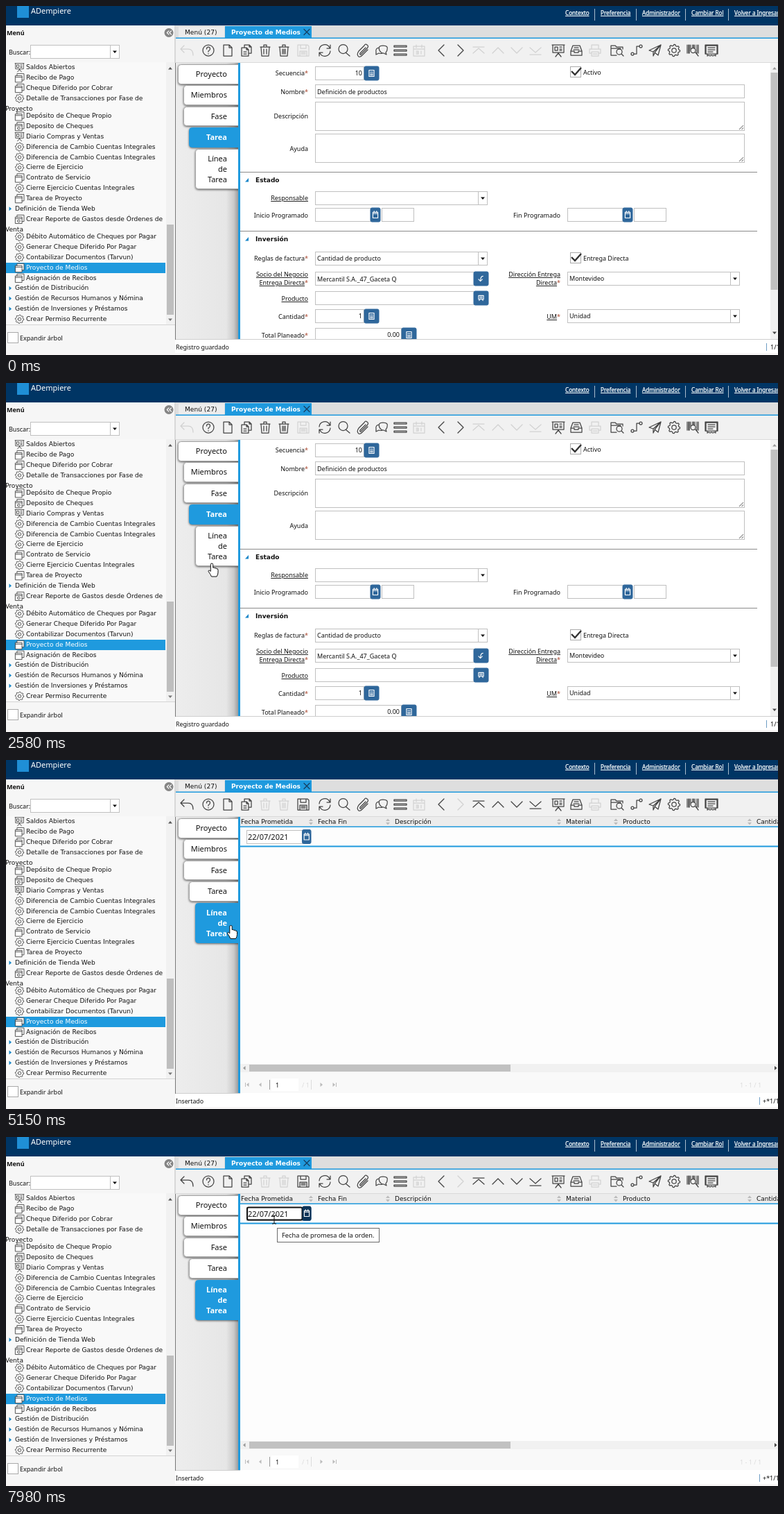
An HTML page for the animation above (8000 ms loop, 1114 by 503 pixels).

```html
<!DOCTYPE html>
<html lang="es">
<head>
<meta charset="utf-8">
<title>Proyecto de Medios</title>
<style>
html, body { margin: 0; width: 100%; height: 100%; overflow: hidden; background: #fff; }
svg { display: block; width: 1114px; height: 503px; }
text { font-family: "Noto Sans", "Open Sans", sans-serif; font-size: 9px; fill: #111; white-space: pre; }
.v { font-family: "DejaVu Sans", sans-serif; }
.b { font-weight: bold; }
.u { text-decoration: underline; }
.e { text-anchor: end; }
.w { fill: #fff; }
.u.w { stroke: #fff; stroke-width: .25; }
.i { stroke-width: 1.25; stroke-linecap: round; stroke-linejoin: round; }
.tab { filter: drop-shadow(0 1px 1.5px rgba(0, 0, 0, .6)); }
</style>
</head>
<body>
<svg id="stage" viewBox="0 0 1114 503" xmlns="http://www.w3.org/2000/svg"></svg>
<script>
const BLUE = '#1f9ade', BTN = '#2f679b', INK = '#444', PALE = '#d2d2d2', EDGE = '#c0c0c0';

// Drawing helpers; boxes are given by their corners
const box = (x, y, x2, y2, fill, more = '') =>
  `<rect x="${x}" y="${y}" width="${x2 - x}" height="${y2 - y}" fill="${fill}" ${more}/>`;
const frame = (x, y, x2, y2, fill = '#fff', line = EDGE, more = '') =>
  box(x + .5, y + .5, x2 - .5, y2 - .5, fill, `stroke="${line}" ${more}`);
const text = (x, y, s, cls = '', size = 9) =>
  `<text x="${x}" y="${y}" class="${cls}" style="font-size:${size}px">${s}</text>`;
const path = (x, y, d, fill, more = '') =>
  `<path transform="translate(${x} ${y})" d="${d}" fill="${fill}" ${more}/>`;
const icon = (x, y, d, color = INK, scale = 1, fill = 'none') =>
  `<path class="i" transform="translate(${x} ${y}) scale(${scale})" d="${d}" stroke="${color}" fill="${fill}"/>`;
const tri = { down: 'M-3-1.5H3L0 2Z', up: 'M-3 1.5H3L0-2Z', left: 'M1.5-3V3L-2 0Z', right: 'M-1.5-3V3L2 0Z' };

const circle = r => `M${-r} 0a${r} ${r} 0 1 0 ${2 * r} 0a${r} ${r} 0 1 0 ${-2 * r} 0`;
const gear = (() => {
  let d = '';
  for (let k = 0; k < 32; k++) {
    const a = k * Math.PI / 16, r = k % 4 < 2 ? 8.6 : 6.8;
    d += `${k ? 'L' : 'M'}${(r * Math.cos(a)).toFixed(1)} ${(r * Math.sin(a)).toFixed(1)}`;
  }
  return d + 'Z' + circle(3.2);
})();
const board = 'M-9-8H9M-8-8V3H8V-8M0 3V5M0 4L-4 9M0 4L4 9M-5-5H-1V0H-5ZM2-5H5M2-2H5M2 0H5';
const windows = 'M-5-4V-8H9V5H5M-8-4H5V9H-8ZM-8-1H5';
const trash = 'M-6-5L-5 8H5L6-5M-7-5H7M-2-5V-8H2V-5M-2-2V5M2-2V5';
const page = 'M-6-8H2L6-4V8H-6ZM2-8V-4H6';
const calendar = 'M-8-6H8V8H-8ZM-8-2H8M-4-8V-4M4-8V-4';

const toolbar = [
  [261, 'undo', 'M-4-7L-9-2L-4 3M-9-2H2Q9-2 9 7'],
  [292, '', circle(8) + 'M-2.5-2Q-2.5-5 0-5T2.5-2Q2.5-.5 0 1V2M0 4.5V5'],
  [320, '', page],
  [347, '', 'M-7-4H0L3-1V8H-7ZM0-4V-1H3M-3-4V-8H4L7-5V4H3M4-8V-5H7M-4 2H0M-4 5H0'],
  [374, 'trash', trash],
  [401, 'trash', trash + 'M0-2V5'],
  [429, 'save', 'M-8-8H6L8-6V8H-8ZM-4-8V-3H4V-8M-5 8V1H5V8M-3 3H3M-3 5H3'],
  [460, '', 'M-8-1A8 8 0 0 1 7-4M8 1A8 8 0 0 1-7 4M8-8V-3H3M-8 8V3H-3'],
  [488, '', 'M-8-2a6.5 6.5 0 1 0 13 0a6.5 6.5 0 1 0-13 0M2 3L8 8'],
  [515, '', 'M4-4L-4 4Q-5 6-3 6L6-3Q9-6 6-8T2-7L-6 1Q-9 5-7 8T-1 7L7-1'],
  [542, '', 'M-3 0Q-6-7 2-7T8-1Q8 1 6 3L7 6L3 4Q-1 4-3 0M-4-4Q-9-3-8 2L-8 6L-4 4Q0 5 1 4'],
  [569, '', 'M-9-7H9V-5H-9ZM-9-1H9V1H-9ZM-9 5H9V7H-9Z'],
  [596, 'cal', calendar + 'M-4 1H-1V5H-4M-4 3H-1M3 1V5'],
  [628, '', 'M4-8L-4 0L4 8'],
  [656, 'next', 'M-4-8L4 0L-4 8'],
  [682, 'nav', 'M-8-5H8M-8 4L0-3L8 4'],
  [710, 'nav', 'M-8 4L0-4L8 4'],
  [737, 'nav', 'M-8-4L0 4L8-4'],
  [764, 'nav', 'M-8 6H8M-8-4L0 3L8-4'],
  [797, '', board],
  [823, '', 'M-8 1L-5-7H5L8 1V7H-8ZM-8 1H-3V3H3V1H8M-3-4H3M-4-1H4'],
  [850, 'print', 'M-5-2V-8H5V-2M-5 4H-8V-2H8V4H5M-5 2H5V8H-5ZM-3 5H3'],
  [882, '', 'M-1 7H-9V-7H-3L-1-5H8V-2M-9-3H5M-1 2a4 4 0 1 0 8 0a4 4 0 1 0-8 0M6 5L9 8'],
  [910, '', 'M-8 5a2 2 0 1 0 4 0a2 2 0 1 0-4 0M4-6a2 2 0 1 0 4 0a2 2 0 1 0-4 0M-4 5H0V-6H4'],
  [937, '', 'M-9 0L8-8L4 7L-1 3L8-8L-3 2ZM-3 2V8L-1 4'],
  [964, '', gear],
  [991, '', 'M-8-8V4M-6-8V4M-5-8V4M-3-8V1M0-8V-4M1-8V-4M3-8V-3M6-8V4M8-8V4M-3 0a3.5 3.5 0 1 0 7 0a3.5 3.5 0 1 0-7 0M4 3L8 8'],
  [1018, '', 'M-9-8H9V5H-9ZM-9-7H9M-8-8V5M8-8V5M-5-4H5M-5-1H5M-5 2H2M-6 5V8L-4 7L-2 8L0 7L2 8L4 7L6 8V5']
];
const drawBar = off => toolbar.map(([x, name, d]) => icon(x, 64, d, off.includes(name) ? PALE : INK)).join('');

const tabs = [
  [248, 84, 113, 'Proyecto'], [256, 114, 143, 'Miembros'], [256, 145, 173, 'Fase'],
  [264, 175, 204, 'Tarea'], [273, 206, 264, 'Línea', 'de', 'Tarea']
];
const drawTabs = active => tabs.map(([x, y, y2, ...lines], n) => {
  const on = n === active;
  return frame(x, y, 340, y2, on ? BLUE : '#fff', on ? BLUE : '#a6a6a6', 'rx="4" class="tab"') +
    lines.map((s, k) => text(319, y + 18 + k * 15, s, on ? 'e b w' : 'e', 11)).join('');
}).join('') + box(335, 82, 338, 480, BLUE);

function drawMenu() {
  const kinds = {
    r: board, w: windows, g: gear,
    f: windows + 'M-4 4a2.5 2.5 0 1 0 5 0a2.5 2.5 0 1 0-5 0'
  };
  const groups = [
    [88, 'r|Saldos Abiertos', 'w|Recibo de Pago', 'w|Cheque Diferido por Cobrar', 'g|Detalle de Transacciones por Fase de'],
    [158, 'w|Depósito de Cheque Propio', 'f|Deposito de Cheques', 'r|Diario Compras y Ventas',
      'g|Diferencia de Cambio Cuentas Integrales', 'g|Diferencia de Cambio Cuentas Integrales',
      'g|Cierre de Ejercicio', 'w|Contrato de Servicio', 'g|Cierre Ejercicio Cuentas Integrales',
      'w|Tarea de Proyecto', 'p|Definición de Tienda Web', 'f|Crear Reporte de Gastos desde Órdenes de'],
    [332, 'g|Débito Automático de Cheques por Pagar', 'g|Generar Cheque Diferido Por Pagar',
      'g|Contabilizar Documentos (Tarvun)', 'w|Proyecto de Medios', 'w|Asignación de Recibos',
      'p|Gestión de Distribución', 'p|Gestión de Recursos Humanos y Nómina',
      'p|Gestión de Inversiones y Préstamos', 'g|Crear Permiso Recurrente']
  ];
  let s = box(0, 28, 244, 503, '#f6f6f6') + text(1, 42, 'Menú', 'b') +
    path(235, 38.5, circle(6.5), '#858585') + icon(235, 38.5, 'M0-3L-3 0L0 3M4-3L1 0L4 3', '#fff', .9) +
    text(4, 70, 'Buscar:') + frame(35, 56, 151, 76) + frame(150, 56, 164, 76) + path(157, 66, tri.down, '#111') +
    box(0, 81, 231, 459, '#f9f9f9') + box(0, 370, 230, 385, BLUE) +
    text(-1, 150.5, 'Proyecto', 'v', 9.08) + text(-1, 324.5, 'Venta', 'v', 9.08);
  for (const [top, ...rows] of groups) rows.forEach((row, n) => {
    const y = top + n * 14.85, [kind, label] = row.split('|'), parent = kind === 'p';
    s += parent ? path(6, y + .5, tri.right, '#1787c9') : icon(19.5, y + .5, kinds[kind], INK, .72, '#fff');
    s += text(parent ? 13 : 29, y + 3.2, label, label === 'Proyecto de Medios' ? 'v w' : 'v', 9.08);
  });
  return s + box(231, 81, 243, 459, '#f1f1f1') + box(232, 315, 242, 445, '#bebebe') +
    path(237, 90, tri.up, '#555') + path(237, 452, tri.down, '#777') +
    box(0, 459, 244, 460, '#d5d5d5') + frame(2, 470, 18, 486, '#fff', '#aaa') + text(20, 482, 'Expandir árbol') +
    box(243, 28, 245, 82, '#d8d8d8') + box(244, 82, 245, 481, '#777');
}

function drawChrome() {
  let s = box(0, 0, 1114, 28, '#003564') + box(16, 0, 33, 17, '#1f8fd6') + text(36, 11, 'ADempiere', 'w', 11);
  [[807, 'Contexto'], [858, 'Preferencia'], [918, 'Administrador'], [989, 'Cambiar Rol'], [1051, 'Volver a Ingresar']]
    .forEach(([x, label], n) => s += text(x, 13, label, 'u w', 8.15) + (n ? box(x - 9, 4, x - 8, 21, '#a9bccd') : ''));
  return s + drawMenu() +
    box(245, 28, 1114, 47, '#dedede') + box(249, 30, 315, 46, '#ececec') + text(258, 41, 'Menú (27)', 'v', 9.1) +
    box(316, 29, 441, 47, BLUE) + text(325, 41, 'Proyecto de Medios', 'v b w', 9) +
    icon(434, 37.5, 'M-4-4L4 4M4-4L-4 4', '#173f61') + box(245, 45.5, 1114, 47, BLUE) +
    box(245, 47, 1114, 82, '#f1f1f1') + box(245, 81, 1114, 82, '#dadada') +
    box(245, 82, 336, 480, 'url(#side)') +
    box(0, 500, 1114, 503, '#f7f5f5') + box(245, 480, 1114, 500, '#fff') + box(245, 480, 1114, 481, '#cfcfcf');
}

const label = (x, y, s, cls = '') => {
  const req = s.endsWith('*');
  return `<text x="${x}" y="${y}" class="e"><tspan class="${cls}">${s.replace('*', '')}</tspan>` +
    (req ? '<tspan fill="#a8452c">*</tspan>' : '') + '</text>';
};
const combo = (x, y, s) => frame(x, y, x + 249, y + 20) + frame(x + 235, y, x + 249, y + 20) +
  path(x + 242, y + 10, tri.down, '#111') + text(x + 3, y + 13, s);
const calc = 'M-4-5H4V5H-4ZM-2-2H2M-2 1H2M-2 3H2';
const day = 'M-4-4H4V5H-4ZM-4-2H4M-2-6V-4M2-6V-4';
const button = (x, y, d, w = 21, color = BTN) =>
  box(x, y, x + w, y + 20, color, `rx="2" stroke="${color}"`) + icon(x + w / 2, y + 10, d, '#fff', .9);
const amount = (y, x2, s) => frame(446, y, x2, y + 20) + text(x2 - 3, y + 13, s, 'e') + button(x2, y, calc);
const check = (y, s) => frame(814, y, 830, y + 16, '#fff', '#aaa') +
  `<path d="M816 ${y + 7}L821 ${y + 12}L830 ${y + 2}" fill="none" stroke="#333" stroke-width="2.4"/>` + text(833, y + 11.5, s);
const dates = x => frame(x, 291, x + 81, 311) + button(x + 80, 291, day, 14) + frame(x + 96, 291, x + 143, 311);
const area = y => frame(446, y, 1066, y + 42) + icon(1061, y + 37, 'M-3 3L3-3M1 3L3 1', '#888', .9);
const section = (y, s) => box(338, y, 1084, y + 1, '#8a8a8a') + path(348, y + 12, 'M2-3V2.5H-3Z', '#1787c9') + text(360, y + 14.5, s, 'v b');

function drawForm() {
  return drawBar(['undo', 'save', 'cal', 'nav', 'print']) + drawTabs(3) + box(338, 82, 1103, 480, '#fff') +
    label(436, 100, 'Secuencia*') + amount(87, 517, '10') + check(87, 'Activo') +
    label(436, 127, 'Nombre*') + frame(446, 113, 1066, 133) + text(449, 126.5, 'Definición de productos') +
    label(436, 162, 'Descripción') + area(138) + label(436, 209, 'Ayuda') + area(184) +
    section(239, 'Estado') + label(436, 280, 'Responsable', 'u') + combo(446, 267, '') +
    label(436, 305, 'Inicio Programado') + dates(446) + label(800, 305, 'Fin Programado') + dates(810) +
    section(324, 'Inversión') + label(436, 367, 'Reglas de factura*') + combo(446, 354, 'Cantidad de producto') +
    check(355, 'Entrega Directa') +
    label(436, 390, 'Socio del Negocio', 'u') + label(436, 402, 'Entrega Directa*', 'u') +
    frame(446, 383, 676, 403) + text(449, 396.5, 'Mercantil S.A._47_Gaceta Q') +
    button(675, 383, 'M3-4Q-1-4-1 4M-4 1L-1 4L2 1') +
    label(800, 390, 'Dirección Entrega', 'u') + label(800, 402, 'Directa*', 'u') + combo(810, 383, 'Montevideo') +
    label(436, 425, 'Producto', 'u') + frame(446, 411, 676, 431) + button(675, 411, 'M-4-4H4V2H-4ZM-2-2H2M-2 0H2M-3 4L-2 2M3 4L2 2') +
    label(436, 451, 'Cantidad*') + amount(437, 517, '1') + label(800, 451, 'UM*', 'u') + combo(810, 437, 'Unidad') +
    label(436, 477.5, 'Total Planeado*') + amount(464, 571, '0.00') +
    box(446, 480, 600, 500, '#fff') + box(338, 480, 1114, 481, '#cfcfcf') +
    box(1103, 82, 1114, 480, '#f1f1f1') + box(1103.5, 96, 1113.5, 409, '#c1c1c1') +
    path(1109, 90, tri.up, '#999') + path(1109, 471, tri.down, '#444') +
    text(245, 495, 'Registro guardado', '', 8.8) + box(1097, 486, 1098, 497, '#6d9cc4') + text(1103, 495, '1/1');
}

function drawGrid() {
  let s = drawBar(['trash', 'cal', 'next', 'print']) + drawTabs(4) + box(338, 82, 1114, 480, '#fdfdfd') +
    box(338, 82, 1114, 96, '#ececec') + box(338, 95.5, 1114, 97, BLUE) + box(338, 123.5, 1114, 125.5, BLUE);
  [[339, 'Fecha Prometida'], [450, 'Fecha Fin'], [561, 'Descripción'], [808, 'Material'], [890, 'Producto'], [1083, 'Cantidad']]
    .forEach(([x, name], n) => {
      s += text(x, 92, name, 'v');
      if (n) s += path(x - 10, 86.5, tri.up, '#bbb') + path(x - 10, 91.5, tri.down, '#bbb');
    });
  s += frame(347, 101, 429, 121) + text(349, 115, '22/07/2021', '', 11) + button(427.5, 100.5, day, 12.5) +
    `<g id="focus">${box(348, 101.5, 427.5, 119.5, 'none', 'stroke="#111" stroke-width="2" rx="2"')}` +
    button(428, 100, day, 12, '#0d3458') + '</g>' +
    box(338, 438, 1114, 450, '#f1f1f1') + box(351, 439, 728, 449, '#c1c1c1') +
    path(344, 444, tri.left, '#999') + path(1110.5, 444, tri.right, '#444') +
    box(338, 450, 1114, 480, '#f9f9f9') + box(383, 459, 422, 477, '#fff') + text(389, 471.5, '1') + box(380, 461, 381, 475, '#999') +
    box(440, 461, 441, 475, '#ddd');
  for (const [x, dir, bar] of [[349, 'left', 345], [367, 'left'], [455, 'right'], [473, 'right', 476]])
    s += path(x, 468, tri[dir], '#bbb') + (bar ? box(bar, 465, bar + 1, 471, '#bbb') : '');
  return s + `<g opacity=".12">${text(427, 471.5, '/ 1') + text(1059, 471.5, '1 - 1 / 1')}</g>` +
    box(338, 480, 1114, 481, '#fff') +
    text(245, 495, 'Insertado', '', 8.8) + box(1087, 486, 1088, 497, '#6d9cc4') + text(1092, 495, '+*1/1');
}

const pointers = {
  arrow: 'M0 0V13.5L3.2 10.6L5.3 15.6L7.4 14.7L5.3 9.9H9.4Z',
  hand: 'M-1.7 10V1.6Q-1.7 0 0 0T1.7 1.6V6.2Q4 5 4.3 7Q6.6 5.8 6.9 7.8Q9 7.2 9 9.5V13Q9 16 7 19H-.5Q-2 15.5-5 11.5Q-4.6 8.4-1.7 11.5Z',
  beam: 'M-3-6H-1L0-5L1-6H3M0-5V5M-3 6H-1L0 5L1 6H3'
};

const stage = document.getElementById('stage');
stage.innerHTML = `<defs><linearGradient id="side"><stop offset="0" stop-color="#ededed"/><stop offset=".8" stop-color="#e6e6e6"/>
  <stop offset=".92" stop-color="#cacaca"/><stop offset="1" stop-color="#959595"/></linearGradient></defs>` + drawChrome() +
  `<g id="form">${drawForm()}</g><g id="grid">${drawGrid()}${box(350, 103, 351, 118, '#111', 'id="caret"')}
  <g id="tip">${frame(391, 131, 539, 152, '#fff', '#6b6b6b') + text(398, 145, 'Fecha de promesa de la orden.', '', 9.25)}</g></g>
  <path id="pointer" stroke="#111" stroke-linejoin="round"/>`;
const el = id => document.getElementById(id);
const show = (id, on) => el(id).style.display = on ? '' : 'none';

// Pointer moves: start, end, number of steps, waypoints
const moves = [
  [610, 750, 3, [1120, 503], [1084, 485]],
  [950, 1170, 4, [1084, 485], [538, 235]],
  [2030, 2780, 12, [538, 235], [400, 187], [262, 225], [297, 260], [338, 229]],
  [2850, 2920, 2, [338, 229], [281, 218]],
  [3060, 3450, 7, [281, 218], [278, 240], [300, 253], [325, 238], [318, 228]],
  [3980, 4220, 4, [318, 228], [324.5, 238.5]],
  [5890, 6170, 5, [324.5, 238.5], [377, 135]],
  [6240, 6460, 4, [377, 135], [387, 118]],
  [7980, 7981, 1, [387, 118], [387, 119]]
];

function pointerAt(t) {
  const move = moves.filter(m => t >= m[0]).pop();
  if (!move) return null;
  const [from, to, steps, ...points] = move;
  const done = Math.min(steps, 1 + Math.floor((t - from) / (to - from) * (steps - 1) + .2));
  const u = done / steps * (points.length - 1), k = Math.min(Math.floor(u), points.length - 2);
  return points[k].map((p, axis) => p + (points[k + 1][axis] - p) * (u - k));
}

function pointerKind(x, y, grid) {
  if (x < 335 && tabs.some(([left, top, bottom]) => x >= left && y >= top && y <= bottom)) return 'hand';
  const inField = grid ? x > 347 && x < 428 && y < 120 : x > 447 && x < 1066 && y > 184 && y < 226;
  return inField ? 'beam' : 'arrow';
}

function draw() {
  const t = performance.now() % 8000, grid = t >= 5150, at = pointerAt(t), pointer = el('pointer');
  show('form', !grid);
  show('grid', grid);
  show('focus', t >= 5360);
  show('caret', t >= 5360 && Math.floor((t - 5360) / 524) % 2 === 0);
  show('tip', t >= 6920);
  show('pointer', at);
  if (at) {
    const kind = pointerKind(...at, grid);
    pointer.setAttribute('d', pointers[kind]);
    pointer.setAttribute('fill', kind === 'beam' ? 'none' : '#fff');
    pointer.setAttribute('transform', `translate(${at})`);
  }
  requestAnimationFrame(draw);
}
draw();
</script>
</body>
</html>
```
